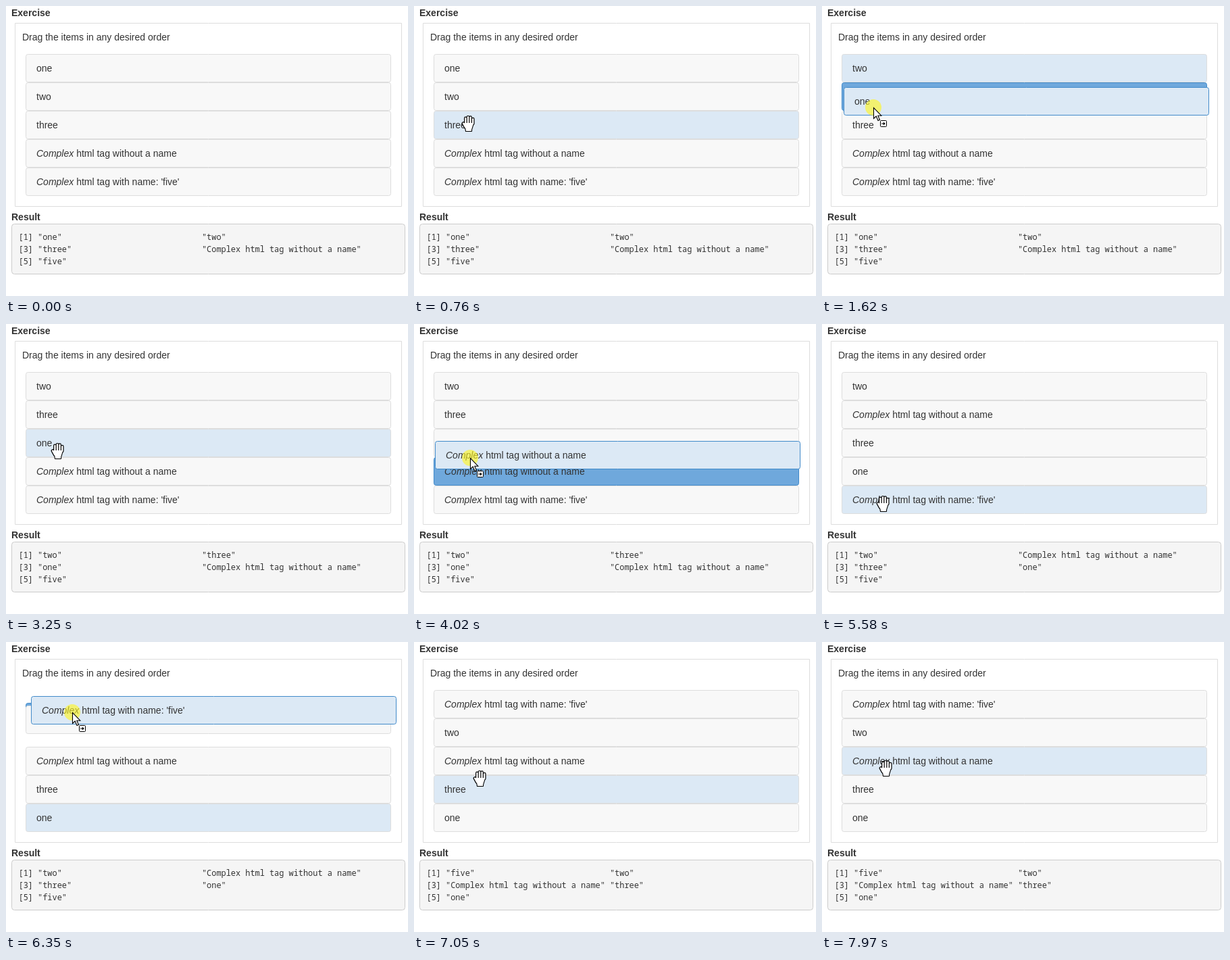
Animation, 595 px wide and 429 px high, one loop 8 s. Source, as an HTML page with a canvas:

```html
<!DOCTYPE html>
<html lang="en">
<head>
<meta charset="utf-8">
<title>Sortable list</title>
<style>
  html, body { margin: 0; width: 100%; height: 100%; overflow: hidden; background: #fff; }
  canvas { display: block; }
</style>
</head>
<body>
<canvas id="stage" width="595" height="429"></canvas>
<script>
const ctx = document.getElementById('stage').getContext('2d');
const LOOP = 8000, FIRST = 70, REFRESH = 77.45;
const TOP = 71, LEFT = 29, WIDTH = 541, ROW = 42, SLIDE = 150;
const SANS = '"Liberation Sans", Arial, sans-serif';
const MONO = '11.92px "Noto Sans Mono", "DejaVu Sans Mono", monospace';

const items = [
  { text: 'one', name: 'one' },
  { text: 'two', name: 'two' },
  { text: 'three', name: 'three' },
  { lead: 'Complex', text: ' html tag without a name', name: 'Complex html tag without a name' },
  { lead: 'Complex', text: " html tag with name: 'five'", name: 'five' }
];

// Pointer moves: start, end, x, y
const entry = [104, 424];
const moves = [
  [FIRST, 860, 73, 101], [1130, 1620, 76, 150], [1900, 2170, 76, 184],
  [3240, 3560, 81, 222], [3830, 4480, 89, 140], [4630, 5350, 90, 263],
  [5690, 6330, 98, 104], [6650, 7280, 96, 258], [7400, 7960, 94, 184]
];

const mix = (a, b, p) => a + (b - a) * p;

function pointerAt(t) {
  let [x, y] = entry;
  for (const [a, b, tx, ty] of moves) {
    if (t < a) break;
    const p = Math.min(1, (t - a) / (b - a));
    x = mix(x, tx, p);
    y = mix(y, ty, p);
  }
  return [Math.round(x), Math.round(y)];
}

function slotAt(y) {
  const slot = Math.floor((y - TOP) / ROW);
  return slot >= 0 && slot < items.length ? slot : -1;
}

const drags = [[1090, 2330], [3790, 4600], [5580, 6640]].map(([press, drop]) => {
  const start = pointerAt(press);
  const wake = moves.find(m => m[0] > drop)[0];
  return { press, drop, start, wake, lift: press + 110, show: drop + 60, origin: slotAt(start[1]) };
});

// The dragged item changes places whenever the pointer enters another slot
const swaps = [];
for (const { press, drop, origin } of drags) {
  let from = origin;
  for (let t = press; t < drop; t += 2) {
    const to = slotAt(pointerAt(t)[1]);
    if (to !== from) swaps.push({ when: t, from, to });
    from = to;
  }
}

// CSS "ease" timing, cubic-bezier(.25, .1, .25, 1)
function ease(x) {
  if (x >= 1) return 1;
  const bez = (u, a, b) => 3 * u * (1 - u) * ((1 - u) * a + u * b) + u * u * u;
  let lo = 0, hi = 1;
  for (let i = 0; i < 20; i++) {
    const mid = (lo + hi) / 2;
    if (bez(mid, .25, .25) < x) lo = mid; else hi = mid;
  }
  return bez(lo, .1, 1);
}

function listAt(t) {
  const order = items.slice();
  const y = new Map(order.map((it, i) => [it, TOP + i * ROW]));
  for (const { when, from, to } of swaps) {
    if (when > t) break;
    const p = ease((t - when) / SLIDE);
    y.set(order[from], TOP + mix(from, to, p) * ROW);
    y.set(order[to], TOP + mix(to, from, p) * ROW);
    [order[from], order[to]] = [order[to], order[from]];
  }
  return { order, y };
}

function box(x, y, w, h, r, fill, line) {
  ctx.beginPath();
  ctx.roundRect(x + .5, y + .5, w - 1, h - 1, r);
  ctx.fillStyle = fill;
  ctx.fill();
  ctx.strokeStyle = line;
  ctx.lineWidth = 1;
  ctx.stroke();
}

function write(text, x, y, font) {
  ctx.font = font;
  ctx.fillStyle = '#333';
  ctx.fillText(text, x, y);
  return ctx.measureText(text).width;
}

const looks = {
  plain: ['#f8f8f8', '#ddd'],
  hover: ['#dce9f5', '#ddd'],
  chosen: ['#dce9f5', '#428bca'],
  ghost: ['#6fa8dc', '#428bca']
};

function drawItem(item, x, y, look) {
  y = Math.round(y);
  box(x, y, WIDTH, ROW, 3, ...looks[look]);
  let tx = x + 16;
  if (item.lead) tx += write(item.lead, tx, y + 26, 'italic 14px ' + SANS);
  write(item.text, tx, y + 26, '14px ' + SANS);
}

function drawResult(order) {
  box(8, 322, 583, 75, 4, '#f5f5f5', '#ccc');
  const names = order.map(it => '"' + it.name + '"');
  const width = Math.max(...names.map(n => n.length)) + 1;
  for (let i = 0; i < names.length; i += 2) {
    const line = `[${i + 1}] ` + names[i].padEnd(width) + (names[i + 1] || '');
    write(line, 18.5, 346 + i * 9, MONO);
  }
}

function trace(points, close) {
  ctx.beginPath();
  points.forEach(([x, y]) => ctx.lineTo(x, y));
  if (close) ctx.closePath();
}

function drawArrow() {
  trace([[.5, .5], [.5, 16.5], [4.2, 13], [7, 19.5], [9.5, 18.5], [6.8, 12.2], [11.8, 12.2]], true);
  ctx.fillStyle = '#fff';
  ctx.fill();
  ctx.strokeStyle = '#000';
  ctx.lineWidth = 1.1;
  ctx.stroke();
}

// Four fingers and a thumb on a palm: a black layer, then a thinner light one
function drawHand(closed) {
  const reach = closed ? 2 : 5, wrist = closed ? 7.5 : 14;
  const palm = [[-5, 2], [7.5, 2], [7.5, 4], [5, wrist - 2], [5, wrist], [-3, wrist], [-3.5, wrist - 3], [-7, 3]];
  const layer = (color, width, edge) => {
    ctx.strokeStyle = ctx.fillStyle = color;
    ctx.lineWidth = width;
    for (let i = 0; i < 4; i++) {
      const x = -3.6 + i * 3.6;
      trace([[x, -reach - 1.8 + (i - 1.3) ** 2], [x, 3]]);
      ctx.stroke();
    }
    trace([[-7, 2.5], [-4, closed ? 4 : 8]]);
    ctx.stroke();
    trace(palm, true);
    ctx.fill();
    ctx.lineWidth = edge;
    if (edge) ctx.stroke();
  };
  ctx.lineCap = ctx.lineJoin = 'round';
  layer('#000', 4.8, 2.2);
  layer(closed ? '#fffca0' : '#fff', 2.4, 0);
  ctx.lineCap = 'butt';
  ctx.lineJoin = 'miter';
}

function drawBadge() {
  box(10, 19, 10, 10, 1, '#fff', '#000');
  trace([[12, 24], [16.5, 24]]);
  ctx.stroke();
  trace([[14.8, 21.5], [17.8, 24], [14.8, 26.5]], true);
  ctx.fillStyle = '#000';
  ctx.fill();
}

function draw(t) {
  const [px, py] = pointerAt(t);
  const { order, y } = listAt(t);
  const drag = drags.filter(d => d.press <= t).pop();
  const pressed = drag && t < drag.drop, lifted = pressed && t >= drag.lift;
  const held = pressed ? listAt(drag.press).order[drag.origin] : null;
  const hover = drag && t < drag.wake ? drag.origin : slotAt(py);

  ctx.fillStyle = '#fff';
  ctx.fillRect(0, 0, 595, 429);
  write('Exercise', 8, 15, 'bold 14px ' + SANS);
  box(13, 25, 573, 272, 0, '#fff', '#ddd');
  write('Drag the items in any desired order', 24, 51, '14px ' + SANS);
  write('Result', 8, 317, 'bold 14px ' + SANS);
  const shown = drags.filter(d => d.show <= t).pop();
  drawResult(listAt(shown ? shown.show : 0).order);

  order.forEach((it, i) => {
    const look = it === held ? (lifted ? 'ghost' : 'chosen') : i === hover ? 'hover' : 'plain';
    drawItem(it, LEFT, y.get(it), look);
  });
  if (lifted) {
    const [sx, sy] = drag.start;
    drawItem(held, LEFT + px - sx, TOP + drag.origin * ROW + py - sy, 'chosen');
  }

  if (t < FIRST) return;
  ctx.save();
  ctx.translate(px, py);
  if (pressed) {
    ctx.beginPath();
    ctx.arc(0, 0, 12, 0, 7);
    ctx.fillStyle = 'rgba(255, 245, 30, .62)';
    ctx.fill();
  }
  if (lifted) drawBadge();
  const resting = drag && !pressed && t < Math.max(drag.wake, drag.show);
  if (lifted || resting || slotAt(py) < 0) drawArrow();
  else drawHand(pressed);
  ctx.restore();
}

function tick() {
  const t = performance.now() % LOOP;
  draw(FIRST + Math.floor((t - FIRST) / REFRESH) * REFRESH);
  requestAnimationFrame(tick);
}
tick();
</script>
</body>
</html>
```
